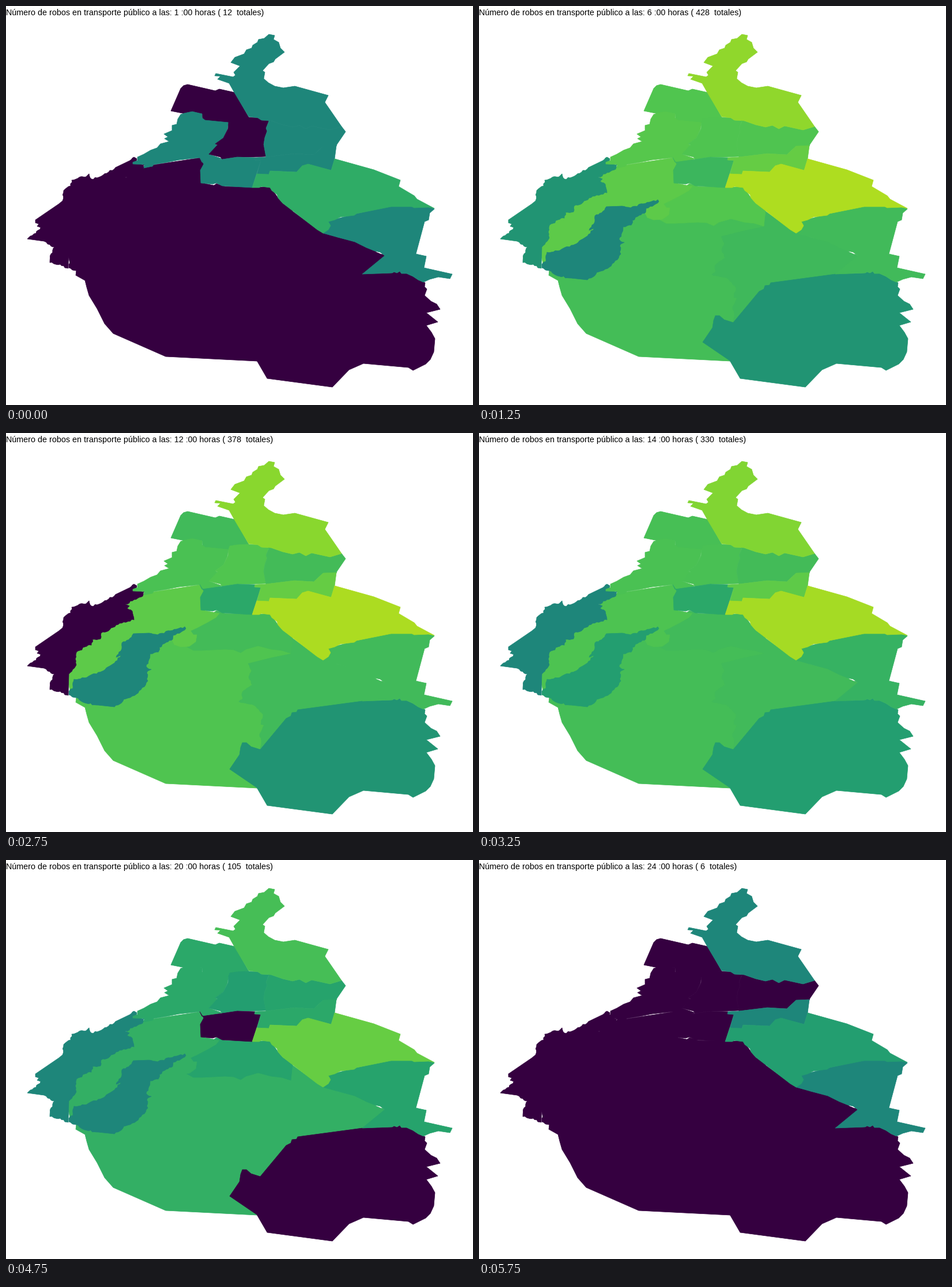
Recreate the animation shown at these times as a matplotlib script. Size 810x692 px, loop 6 s.

```python
import math
import random

import matplotlib.pyplot as plt
import numpy as np
from matplotlib.animation import FuncAnimation
from matplotlib.patches import Polygon

W, H, DPI = 810, 692, 100
HOURS = 24
KEY_HOURS = [1, 3, 6, 10, 12, 17, 20, 22, 24]

EMPTY = (53 / 255, 0, 64 / 255)
# count, red, green, blue
RAMP = np.array([
    (1, 30, 134, 122), (2, 33, 148, 115), (3, 35, 158, 112), (4, 38, 163, 108),
    (6, 47, 172, 102), (8, 54, 178, 98), (11, 63, 184, 91), (15, 70, 190, 86),
    (24, 80, 197, 79), (30, 91, 201, 74), (37, 102, 205, 67), (46, 118, 209, 58),
    (64, 137, 215, 46), (83, 155, 216, 40), (116, 174, 221, 32),
])


def shade(n):
    if n == 0:
        return EMPTY
    return tuple(np.interp(math.log(n), np.log(RAMP[:, 0]), c) / 255
                 for c in RAMP[:, 1:].T)


def rough(points, amp=1.5):
    """Break short border segments into small seeded teeth."""
    rng = random.Random(4)
    out = []
    for (x0, y0), (x1, y1) in zip(points, points[1:] + points[:1]):
        out.append((x0, y0))
        d = math.hypot(x1 - x0, y1 - y0)
        if 8 < d < 27:
            n = int(d // 4) + 1
            for i in range(1, n):
                k, off = i / n, rng.uniform(-amp, amp)
                out.append((x0 + (x1 - x0) * k - (y1 - y0) / d * off,
                            y0 + (y1 - y0) * k + (x1 - x0) / d * off))
    return out


def curve(*keys):
    """Hourly counts, eased between key hours on a log scale."""
    logs = np.interp(range(1, HOURS + 1), KEY_HOURS, np.log1p(keys))
    return np.rint(np.expm1(logs)).astype(int)


def digits(text):
    return np.array([int(c) for c in text])


fig = plt.figure(figsize=(W / DPI, H / DPI), dpi=DPI, facecolor="white")
ax = fig.add_axes([0, 0, 1, 1])
ax.set_xlim(0, W)
ax.set_ylim(H, 0)
ax.axis("off")

regions = []


def region(points, counts):
    patch = Polygon(points, closed=True, lw=0.5, joinstyle="round",
                    zorder=len(regions) + 1)
    ax.add_patch(patch)
    regions.append((patch, counts))


# Regions are stacked: later ones cover the hidden edges of earlier ones.
south = [
    (122, 458), (121, 467), (137, 476), (140, 488), (144, 502), (158, 525),
    (171, 551), (186, 568), (277, 608), (436, 616), (445, 545), (470, 400),
    (495, 385), (497, 356), (440, 345), (300, 350), (280, 355), (235, 375),
    (225, 420), (180, 455)]
region(south, curve(0, 0, 14, 15, 23, 6, 7, 0, 0))

southeast = [
    (497, 356), (550, 394), (575, 401), (605, 408), (640, 425), (657, 433),
    (640, 470), (506, 490), (450, 560), (425, 552), (441, 549), (443, 537),
    (440, 522), (448, 507), (442, 505), (446, 488), (430, 472), (404, 466),
    (411, 460), (409, 455), (412, 447), (427, 437), (421, 423), (426, 412),
    (420, 400), (460, 390), (494, 383)]
region(rough(southeast, 1), curve(0, 0, 11, 8, 12, 11, 7, 1, 0))

far_south = [
    (388, 583), (405, 558), (407, 545), (410, 537), (417, 537), (425, 544),
    (441, 549), (486, 495), (494, 491), (496, 485), (504, 484), (506, 480),
    (618, 465), (670, 463), (673, 461), (678, 463), (683, 460), (686, 464),
    (695, 464), (706, 469), (715, 475), (727, 480), (726, 487), (730, 491),
    (726, 502), (737, 512), (747, 517), (753, 526), (729, 532), (749, 548),
    (729, 554), (738, 566), (744, 577), (742, 600), (736, 613), (728, 621),
    (706, 632), (698, 627), (620, 620), (595, 631), (566, 661), (453, 646),
    (435, 615)]
region(far_south, digits("000002233132131220000000"))

center_south = [
    (365, 308), (380, 313), (443, 314), (458, 313), (472, 333), (480, 342),
    (497, 354), (494, 382), (478, 377), (460, 375), (437, 369), (427, 372),
    (416, 375), (407, 381), (395, 376), (380, 375), (340, 377), (325, 377),
    (314, 371), (310, 350)]
region(center_south, curve(0, 0, 25, 18, 13, 10, 4, 1, 0))

west = [
    (215, 280), (240, 278), (345, 262), (345, 308), (370, 313), (364, 320),
    (350, 328), (331, 338), (320, 343), (325, 350), (331, 350), (329, 362),
    (318, 370), (303, 371), (292, 367), (287, 357), (290, 351), (298, 345),
    (262, 358), (222, 375), (215, 410), (175, 440), (112, 451), (105, 420),
    (118, 380), (150, 345), (205, 310)]
region(west, curve(0, 1, 31, 29, 31, 11, 7, 2, 0))

southwest = [
    (109, 448), (116, 443), (118, 427), (140, 424), (160, 415), (172, 410),
    (180, 404), (190, 396), (200, 386), (191, 389), (199, 378), (201, 364),
    (215, 356), (221, 348), (248, 347), (263, 350), (285, 343), (310, 336),
    (312, 339), (304, 345), (290, 351), (289, 358), (278, 363), (266, 372),
    (264, 380), (250, 383), (248, 393), (243, 405), (252, 410), (244, 416),
    (246, 430), (240, 440), (226, 453), (208, 461), (188, 475), (160, 472),
    (140, 469), (122, 459), (109, 454)]
region(rough(southwest), digits("000011234321233453211010"))

far_west = [
    (37, 404), (52, 394), (60, 384), (54, 382), (57, 378), (51, 376),
    (51, 371), (92, 343), (98, 338), (100, 320), (112, 312), (114, 302),
    (127, 297), (139, 296), (144, 291), (148, 300), (158, 298), (175, 290),
    (190, 280), (215, 268), (222, 262), (227, 265), (226, 272), (240, 275),
    (237, 283), (222, 289), (207, 297), (214, 300), (210, 304), (219, 309),
    (222, 324), (197, 330), (180, 341), (165, 347), (164, 357), (150, 358),
    (148, 368), (140, 370), (125, 378), (121, 385), (122, 402), (109, 418),
    (108, 455), (102, 454), (94, 448), (76, 445), (78, 430), (84, 418),
    (76, 414), (66, 408)]
region(rough(far_west), digits("010132234210113222310000"))

northwest = [
    (286, 182), (303, 143), (308, 138), (315, 136), (363, 147), (370, 144),
    (397, 150), (421, 193), (400, 196), (386, 203), (345, 199), (341, 196),
    (340, 187), (323, 184), (311, 187)]
region(northwest, curve(0, 0, 24, 28, 12, 23, 5, 1, 0))

inner_west = [
    (309, 186), (323, 183), (340, 187), (340, 194), (345, 198), (386, 202),
    (384, 214), (377, 229), (363, 239), (367, 242), (352, 257), (375, 265),
    (345, 275), (336, 263), (318, 265), (300, 267), (280, 271), (256, 275),
    (254, 278), (239, 281), (240, 275), (220, 274), (220, 271), (228, 268),
    (228, 262), (239, 257), (251, 250), (262, 246), (268, 239), (283, 235),
    (275, 230), (281, 227), (274, 222), (288, 216), (288, 207), (296, 205),
    (298, 196), (303, 188)]
region(inner_west, curve(1, 1, 27, 21, 18, 18, 5, 1, 0))

core = [
    (421, 193), (437, 194), (443, 198), (456, 199), (451, 212), (453, 217),
    (449, 228), (447, 240), (451, 261), (430, 262), (401, 262), (375, 266),
    (372, 262), (352, 257), (367, 241), (363, 239), (377, 229), (385, 213),
    (386, 202), (388, 196), (400, 194)]
region(core, curve(0, 1, 23, 28, 24, 10, 3, 1, 0))

center = [
    (336, 263), (340, 271), (375, 266), (401, 262), (432, 263), (431, 267),
    (442, 268), (427, 315), (375, 312), (365, 307), (358, 309), (348, 308),
    (338, 307), (337, 285), (343, 274)]
region(center, curve(1, 1, 10, 8, 5, 4, 0, 1, 0))

inner_east = [
    (454, 197), (480, 206), (497, 210), (509, 207), (520, 213), (530, 208),
    (562, 215), (582, 209), (589, 218), (574, 240), (573, 243), (550, 243),
    (534, 258), (500, 256), (451, 262), (447, 240), (449, 228), (453, 217),
    (451, 212), (456, 200)]
region(inner_east, curve(1, 1, 23, 11, 13, 13, 4, 1, 0))

mid_east = [
    (432, 263), (451, 262), (500, 256), (534, 258), (550, 243), (573, 242),
    (570, 265), (564, 285), (524, 275), (514, 278), (504, 288), (458, 286),
    (456, 292), (435, 292), (442, 268), (431, 267)]
region(mid_east, curve(1, 1, 36, 30, 36, 27, 5, 2, 1))

far_east = [
    (743, 352), (735, 359), (733, 371), (726, 374), (711, 430), (729, 434),
    (725, 454), (774, 465), (770, 473), (750, 470), (735, 474), (724, 479),
    (715, 475), (706, 469), (695, 464), (686, 464), (683, 460), (678, 463),
    (673, 461), (670, 463), (618, 465), (657, 433), (649, 427), (640, 425),
    (625, 419), (605, 409), (575, 401), (550, 394), (559, 385), (559, 373),
    (608, 360), (668, 347), (737, 349)]
region(far_east, curve(1, 1, 12, 12, 12, 4, 4, 1, 1))

east = [
    (435, 291), (456, 292), (458, 286), (504, 288), (514, 277), (524, 274),
    (564, 285), (570, 265), (638, 284), (684, 302), (681, 313), (708, 329),
    (713, 335), (743, 351), (733, 349), (708, 350), (704, 348), (668, 348),
    (608, 360), (604, 363), (580, 366), (570, 371), (559, 374), (563, 381),
    (559, 388), (550, 394), (540, 388), (497, 355), (480, 342), (472, 333),
    (470, 327), (461, 320), (458, 315), (443, 313), (439, 315), (427, 315)]
region(east, curve(6, 6, 116, 113, 112, 83, 37, 11, 3))

north = [
    (428, 68), (436, 63), (438, 58), (448, 56), (456, 49), (466, 51),
    (464, 58), (473, 63), (476, 73), (483, 80), (467, 92), (464, 97),
    (456, 100), (445, 112), (449, 115), (447, 126), (455, 133), (466, 139),
    (481, 142), (501, 139), (559, 155), (553, 167), (562, 180), (582, 209),
    (562, 215), (530, 208), (520, 213), (509, 207), (497, 210), (480, 206),
    (460, 199), (443, 198), (437, 194), (421, 192), (396, 150), (387, 134),
    (367, 127), (372, 122), (362, 121), (364, 117), (394, 123), (398, 120),
    (395, 115), (406, 104), (390, 98), (397, 89), (413, 83), (417, 76),
    (426, 73)]
region(north, curve(1, 2, 71, 64, 64, 46, 15, 4, 1))

title = ax.text(0, 16.4, "", family="Liberation Sans", size=14.25 * 72 / DPI,
                color="black", va="baseline", zorder=50)


def draw(i):
    for patch, counts in regions:
        patch.set_color(shade(counts[i]))
    total = sum(int(counts[i]) for _, counts in regions)
    title.set_text(f"Número de robos en transporte público a las: {i + 1} :00 "
                   f"horas ( {total}  totales)")
    return [patch for patch, _ in regions] + [title]


anim = FuncAnimation(fig, draw, frames=HOURS, interval=250, repeat=True,
                     repeat_delay=0, blit=False)
plt.show()
```
